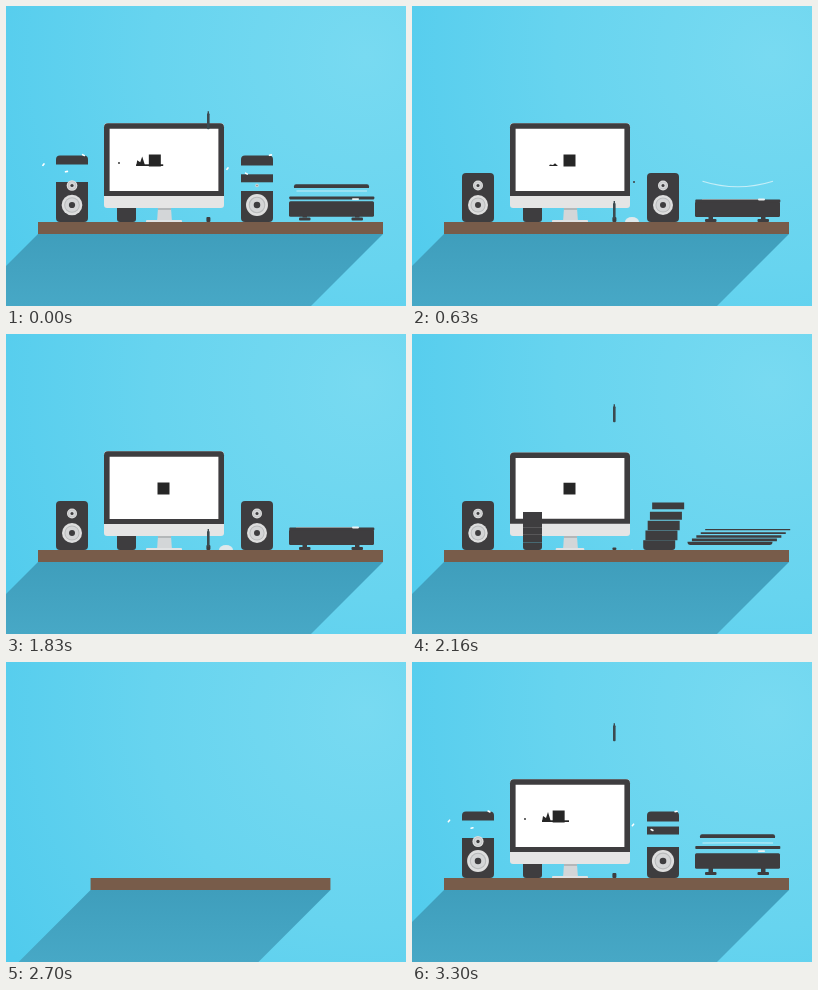
Recreate the animation shown at these times as an HTML page with a canvas. Size 400 px wide and 300 px high, loop 3330 ms.

```html
<!DOCTYPE html>
<html lang="en">
<head>
<meta charset="utf-8">
<title>Desk</title>
<style>
  html, body { margin: 0; width: 100%; height: 100%; overflow: hidden; background: #5bd0ee; }
  canvas { display: block; width: 400px; height: 300px; }
</style>
</head>
<body>
<canvas id="stage" width="400" height="300"></canvas>
<script>
const ctx = document.getElementById('stage').getContext('2d');

// Timeline: the desk is taken apart from HOLD to SWAP, then rebuilt across the loop point.
const LOOP = 3330, HOLD = 1900, SWAP = 2520;
const DESK = 216;
const DARK = '#3e3d3f', INK = '#262626', PALE = '#e5e5e5', WHITE = '#fff';

const clamp = p => Math.min(1, Math.max(0, p));
const mix = (a, b, p) => a + (b - a) * p;
const span = (t, start, dur) => clamp((t - start) / dur);
function ramp(t, start, dur) {
  const p = span(t, start, dur);
  return p * p * (3 - 2 * p);
}
// Ballistic hop: height above rest, symmetric about the apex.
function hop(t, apex, half, height) {
  return height * Math.max(0, 1 - ((t - apex) / half) ** 2);
}
// Spring from 0 to 1 with a small overshoot.
function pop(t, start) {
  const s = (t - start) / 50;
  return s <= 0 ? 0 : 1 - Math.exp(-s) * Math.cos(s * 1.3);
}

function box(x, y, w, h, color, r = 0) {
  if (w <= 0 || h <= 0) return;
  ctx.fillStyle = color;
  ctx.beginPath();
  ctx.roundRect(x, y, w, h, r);
  ctx.fill();
}

function poly(points, color) {
  ctx.fillStyle = color;
  ctx.beginPath();
  points.forEach(([x, y]) => ctx.lineTo(x, y));
  ctx.closePath();
  ctx.fill();
}

function disc(x, y, r, color) {
  ctx.fillStyle = color;
  ctx.beginPath();
  ctx.arc(x, y, r, 0, 7);
  ctx.fill();
}

function bow(x0, x1, y, sag, color, width) {
  ctx.strokeStyle = color;
  ctx.lineWidth = width;
  ctx.beginPath();
  ctx.moveTo(x0, y);
  ctx.quadraticCurveTo((x0 + x1) / 2, y + sag * 2, x1, y);
  ctx.stroke();
}

function turned(x, y, angle, draw) {
  ctx.save();
  ctx.translate(x, y);
  ctx.rotate(angle);
  draw();
  ctx.restore();
}

// A block falls into slices that thin out from the top and fan sideways.
function peel(x, bottom, w, h, q, n = 5) {
  const lag = 0.15, pitch = h / n;
  for (let i = 0; i < n; i++) {
    const p = clamp(q * (1 + lag * (n - 1)) - lag * (n - 1 - i));
    const dx = (i * 5.6 - 9.5) * Math.min(1, q * 2);
    const thick = pitch * (1 - p);
    box(x + dx, bottom - (i + 0.5) * pitch - thick / 2, w, thick, DARK, i ? 0 : [0, 0, 3, 3]);
  }
}

const wall = ctx.createRadialGradient(360, 50, 0, 360, 50, 430);
wall.addColorStop(0, '#78daf1');
wall.addColorStop(0.5, '#67d4ef');
wall.addColorStop(1, '#50cbed');

const shade = ctx.createLinearGradient(0, 228, 0, 300);
shade.addColorStop(0, '#3f9ebc');
shade.addColorStop(1, '#47a8c6');

function shelf(t) {
  const half = 172.5 * (t < SWAP ? 1 - ramp(t, 2240, 256) : ramp(t, 2530, 270));
  if (!half) return;
  const l = 204.5 - half, r = 204.5 + half;
  poly([[l, 228], [r, 228], [r - 72, 300], [l - 72, 300]], shade);
  box(l, DESK, r - l, 12, '#785c4a');
}

function cup(t) {
  if (t < SWAP) return;
  const slide = ramp(t, 3000, 240);
  const h = 38 * ramp(t, 2800, 200);
  turned(mix(107, 120.5, slide), DESK, -0.05 * (1 - slide),
    () => box(-9.5, -h, 19, h, DARK, 3));
}

function cupExit(t) {
  if (t < SWAP) peel(111, DESK, 19, 38, span(t, 2290, 205));
}

function ink(t) {
  const size = 12 * ramp(t, 3170, 110);
  const x = mix(144, 157.5, ramp(t, 3230, 250));
  const tail = 10 * ramp(t, 3180, 110) * Math.exp(-Math.max(0, t - 3300) / 500);
  if (tail > 1.8) {
    const left = mix(130, 137, ramp(t, 3300, 300));
    poly([[left, 160], [left + 1, 160 - tail * 0.6], [left + 4, 160 - tail * 0.4],
      [left + 6, 160 - tail], [left + 9, 160]], INK);
    box(left, 158.3, 27 * ramp(t, 3190, 90) * (1 - ramp(t, 3330, 200)), 1.7, INK);
  }
  box(x - size / 2, 154.5 - size / 2, size, size, INK);
}

function monitor(t) {
  const out = t < SWAP;
  const fold = ramp(t, 2140, 250), sink = ramp(t, 2405, 90);
  const grow = ramp(t, 2840, 240), lift = ramp(t, 2860, 240);
  if (out ? sink === 1 : grow === 0) return;

  const bottom = out ? 202 : DESK - 14 * lift;
  const top = out ? mix(mix(117.3, 176, fold), 202, sink) : mix(DESK, 117.3, grow);
  const chin = out ? mix(mix(190, 176, fold), 202, sink) : bottom - 12 * ramp(t, 2820, 240);
  const foot = 18 * (out ? 1 - ramp(t, 2120, 140) : ramp(t, 3020, 200));
  const neck = mix(bottom, DESK, out ? 1 - ramp(t, 2200, 150) : 1);

  poly([[152, bottom], [165, bottom], [166, neck], [151, neck]], '#d3d6d8');
  box(152, bottom, 13, Math.min(2, neck - bottom), '#b3b7b9');
  box(158 - foot, 214, foot * 2, 2, '#e0e2e3', [1, 1, 0, 0]);

  box(98, top, 120, bottom - top, PALE, 3);
  box(98, top, 120, chin - top, DARK, [4, 4, 0, 0]);
  const rim = out ? 5.5 : 5.5 + 20 * (1 - grow);
  box(103.6, top + rim, 108.8, chin - 5 - top - rim, WHITE);
  if (!out) ink(t);
  else if (fold < 0.4) box(151.5, mix(148.5, 160, fold), 12, 12 * (1 - fold), INK);
}

function driver(x, y, r) {
  if (r <= 0) return;
  disc(x, y, r, '#dedede');
  disc(x, y, r * 0.76, '#b9bbbc');
  disc(x, y, r * 0.66, '#d4d5d6');
  disc(x, y, r * 0.3, DARK);
}

// Slabs between the cut lines ride up by their own lift, topmost first.
function speaker(x, top, bottom, cuts, lifts, tweeter, woofer) {
  const edges = [top, ...cuts.map(c => Math.min(bottom, Math.max(top, c))), bottom];
  lifts.forEach((dy, i) => {
    const a = edges[i], b = edges[i + 1];
    const join = i < lifts.length - 1 && dy === 0 ? 4 : 0;
    const end = Math.min(bottom, b + join);
    const round = Math.min(4, (end - a) / 2);
    const up = i === 0 ? round : 0, down = end === bottom ? round : 0;
    box(x, a - dy, 32, end - a, DARK, [up, up, down, down]);
  });
  driver(x + 16, 179.5, 5 * tweeter);
  driver(x + 16, 199, 10 * woofer);
}

const capLift = t => hop(t, 3315, 90, 18);

function leftSpeaker(t) {
  if (t < SWAP) {
    const top = mix(167, 207, ramp(t, 2170, 215));
    const fall = Math.max(0, t - 2310) / 90;
    const rest = 1 - ramp(t, 2400, 110);
    const size = 1 - ramp(t, 2150, 110);
    turned(66, 212 + 3.5 * fall * fall, 0.22 * fall, () => {
      ctx.translate(-66, -212);
      speaker(50, top, mix(top, DESK, rest), [], [0], size, size);
    });
    return;
  }
  const rise = ramp(t, 2840, 175);
  if (!rise) return;
  const bottom = DESK - hop(t, 3000, 150, 23);
  speaker(50, Math.min(bottom, mix(DESK, 167, rise)), bottom, [176], [capLift(t), 0],
    pop(t, 3200), pop(t, 3180));
  if (t < 3090) {
    const fade = ramp(t, 2900, 60) * (1 - ramp(t, 3020, 70));
    box(51, 182, 30 * fade, 0.9, '#8fd9ea');
    bow(49, 49 + 19 * fade, 204.5, -1, WHITE, 1.6 * fade + 0.01);
  }
}

function rightSpeaker(t) {
  if (t < SWAP) {
    const q = span(t, 2120, 205), size = 1 - ramp(t, 2080, 80);
    if (q) peel(235, DESK, 32, 49, q);
    else speaker(235, 167, DESK, [], [0], size, size);
    return;
  }
  const rise = ramp(t, 2970, 170);
  if (!rise) return;
  speaker(235, mix(DESK, 167, rise), DESK, [177, 185], [capLift(t), hop(t, 3285, 80, 13), 0],
    pop(t, 3315), pop(t, 3215));
}

function pen(t) {
  const out = t < SWAP;
  const y = out ? 195 - 230 * span(t, 2080, 110) ** 2 : 195 - 1.47 * Math.max(0, 3392 - t);
  const base = 5 * (out ? 1 - ramp(t, 2120, 80) : ramp(t, 2900, 80));
  box(200.4, DESK - base, 4, base, DARK, 1);
  box(201, y + 2, 2.6, 16, '#3c4a50', 1);
  box(201.6, y, 1.4, 4, '#3c4a50');
}

function mouse(t) {
  const slide = ramp(t, 3310, 130);
  const size = t < SWAP ? 1 - ramp(t, 2090, 90) : slide;
  ctx.fillStyle = '#dfe8eb';
  ctx.beginPath();
  ctx.ellipse(t < SWAP ? 220 : mix(233, 220, slide), DESK, 7 * size, 5 * size, 0, Math.PI, 2 * Math.PI);
  ctx.fill();
}

function lidArc(t) {
  const loose = ramp(t, 3390, 200), settle = ramp(t, 4700, 330);
  const y = t < 3390 ? 194 - hop(t, 3000, 390, 32) : mix(194, 167 + (t - 3390) / 70, loose);
  const sag = t < 3390 ? -3 * (1 - span(t, 3000, 330)) : (2.8 + (t - 3390) / 210) * loose;
  if (settle < 1) bow(290.5, 361, mix(y, 193.5, settle), sag * (1 - settle), '#c5eef7', 1.1);
}

function turntable(t) {
  const out = t < SWAP;
  const q = span(t, 2080, 205);
  if (out && q > 0) return peel(283, 211, 85, 17, q);
  const grow = out ? 1 : ramp(t, 2740, 220);
  if (!grow) return;

  // Every part peaks together and lands in turn.
  const lift = (half, height) => out ? 0 : hop(t, 3000, half, height);
  const body = lift(333, 23.5), foot = lift(358, 10), plate = lift(345, 40), lid = lift(390, 48);

  ctx.save();
  ctx.translate(325.5, 0);
  ctx.scale(grow, 1);
  ctx.translate(-325.5, 0);
  for (const x of [293, 345.5]) {
    box(x + 3.5, 207 - foot, 4.5, 6, DARK);
    box(x, 213 - foot, 11.5, 3, DARK, 1);
  }
  box(283, 195.5 - body, 85, 15.5, DARK, 1.5);
  box(283.3, 193.6 - plate, 85, 3, DARK, 0.8);
  box(346, 192.6 - body, 7, 1.8, '#edf1f2', 0.8);
  if (!out) lidArc(t);
  if (lid) {
    turned(325.5, 193.5 - lid, -0.045 * (1 - ramp(t, 3000, 270)),
      () => box(-37.5, -1.8, 75, 3.6, DARK, [2, 2, 0, 0]));
  } else {
    box(290, 193, 56, 0.9, '#8b9699');
  }
  ctx.restore();
}

// Scraps thrown off around the speakers while they come together.
const scraps = [[37, 159], [60, 166], [77, 149.5], [221, 163], [264, 149.5], [240, 168]];

function flakes(t) {
  const size = ramp(t, 3210, 60) * (1 - ramp(t, 3340, 80));
  const age = (t - 3300) / 40;
  scraps.forEach(([x, y], i) => turned(x + age * 0.6, y - age * 0.5, i % 3 * 0.7 - 0.9,
    () => box(-1.7, -0.8, 3.4 * size, 1.6 * size, WHITE, 0.6)));
  if (size) disc(113, 157, 0.9 * size, INK);
  const speck = hop(t, 3960, 70, 1);
  if (speck) disc(222, 176 + (t - 3960) / 9, speck, DARK);
}

const parts = [shelf, cup, monitor, cupExit, leftSpeaker, rightSpeaker, pen, mouse, turntable, flakes];

function draw(now) {
  const phase = now % LOOP;
  const t = phase < HOLD ? phase + LOOP : phase;
  ctx.fillStyle = wall;
  ctx.fillRect(0, 0, 400, 300);
  for (const part of parts) part(t);
}

const start = performance.now();
function tick() {
  draw(performance.now() - start);
  requestAnimationFrame(tick);
}
tick();
</script>
</body>
</html>
```
